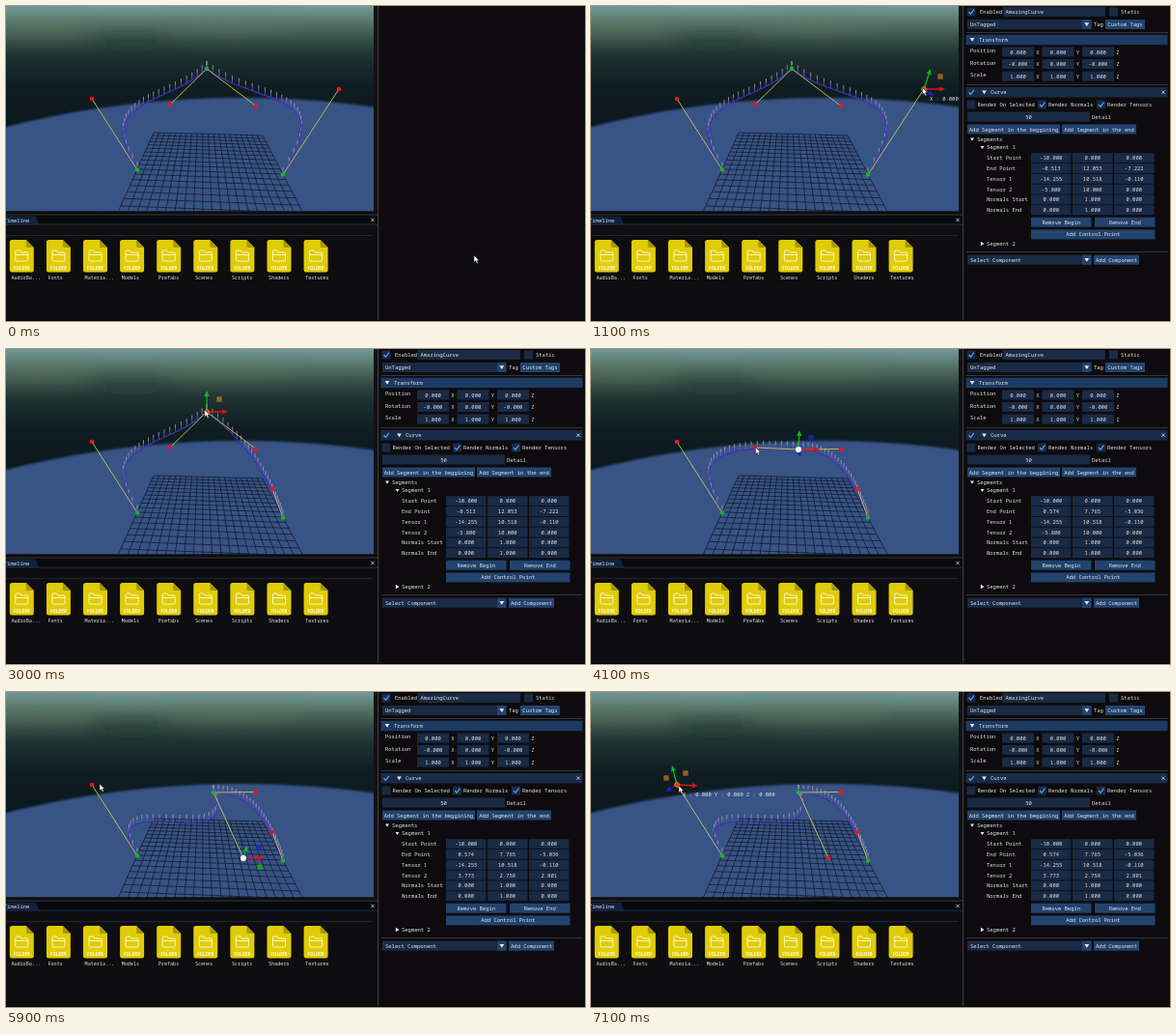
These frames come from a looping animation (600x326 px, 7.2 s). An HTML page:

```html
<!DOCTYPE html>
<html>
<head>
<meta charset="utf-8">
<style>
html, body { margin: 0; width: 100%; height: 100%; overflow: hidden; background: #0d0b0d; }
svg { display: block; width: 600px; height: 326px; }
text { font-family: "Noto Sans Mono", "DejaVu Sans Mono", monospace; font-size: 5.5px; fill: #e4e4e4; white-space: pre; }
</style>
</head>
<body>
<svg id="stage" viewBox="0 0 600 326">
  <defs>
    <linearGradient id="sky" x1="0" y1="0" x2="0" y2="130" gradientUnits="userSpaceOnUse">
      <stop offset="0" stop-color="#72999c"/>
      <stop offset=".07" stop-color="#64877f"/>
      <stop offset=".16" stop-color="#4f6c5e"/>
      <stop offset=".28" stop-color="#324a42"/>
      <stop offset=".4" stop-color="#1e3232"/>
      <stop offset=".62" stop-color="#0f1e23"/>
      <stop offset="1" stop-color="#0a161c"/>
    </linearGradient>
    <filter id="soft" x="-50%" y="-100%" width="200%" height="300%"><feGaussianBlur stdDeviation="9"/></filter>
    <filter id="edge" x="-5%" y="-5%" width="110%" height="110%"><feGaussianBlur stdDeviation=".8"/></filter>
    <clipPath id="view"><rect width="381" height="212.5"/></clipPath>
  </defs>
</svg>
<script>
const LOOP = 7200, STEP = 100;
const stage = document.getElementById("stage");

function add(parent, tag, attrs, str) {
  const n = document.createElementNS("http://www.w3.org/2000/svg", tag);
  for (const k in attrs) n.setAttribute(k, attrs[k]);
  if (str !== undefined) n.textContent = str;
  parent.appendChild(n);
  return n;
}
const set = (n, attrs) => { for (const k in attrs) n.setAttribute(k, attrs[k]); };
const rect = (p, x, y, width, height, fill) => add(p, "rect", { x, y, width, height, fill });
const label = (p, x, y, str, anchor = "start") =>
  add(p, "text", { x, y: y + 2, "text-anchor": anchor }, str);
const path = (p, d, stroke, width = 1, fill = "none") =>
  add(p, "path", { d, stroke, "stroke-width": width, fill });
const show = (n, on) => n.setAttribute("visibility", on ? "visible" : "hidden");
const mix = (a, b, k) => a.map((v, i) => v + (b[i] - v) * k);
const ease = k => k * k * (3 - 2 * k);
const span = (t, a, b) => ease(Math.min(1, Math.max(0, (t - a) / (b - a))));
const fix = v => v.toFixed(3);

// ---- Scene ----
const scene = add(stage, "g", { "clip-path": "url(#view)" });
rect(scene, 0, 0, 382, 213, "url(#sky)");
const clouds = add(scene, "g", { filter: "url(#soft)" });
[[35, 26, 55, 8, "#66806b"], [235, 22, 70, 7, "#5f7d6c"], [130, 42, 55, 7, "#20342f"]]
  .forEach(([cx, cy, rx, ry, fill]) => add(clouds, "ellipse", { cx, cy, rx, ry, fill, opacity: .4 }));
add(scene, "circle", { cx: 243, cy: 1095, r: 1000, fill: "#375385", filter: "url(#edge)" });

// Floor: 20 x 20 cells between two perspective edges
const FAR = 1.336, NEAR = .664;
const edgeAt = (a, b, k) => {
  const w = FAR * (1 - k), v = NEAR * k;
  return a.map((c, i) => (c * w + b[i] * v) / (w + v));
};
const farL = [153, 131], farR = [266, 134], nearL = [101.8, 245], nearR = [329, 254.4];
let floor = "";
for (let i = 0; i <= 20; i++) {
  const k = i / 20;
  floor += `M${mix(farL, farR, k)}L${mix(nearL, nearR, k)}`;
  floor += `M${edgeAt(farL, nearL, k)}L${edgeAt(farR, nearR, k)}`;
}
path(scene, floor, "#0b101c", .65);

const spikeTop = path(scene, "", "#b3a6c0", .75);
const spikeLow = path(scene, "", "#7257cf", .8);
const curve = path(scene, "", "#4130b4", 1.1);
const arms = path(scene, "", "#c9c94a", .9);
const dot = fill => add(scene, "circle", { r: 2.3, fill });
const ends = Array.from({ length: 3 }, () => dot("#17b51f"));
const tensors = Array.from({ length: 4 }, () => dot("#f5121a"));

// ---- Gizmo ----
const gizmo = add(scene, "g", {});
const axes = ["#2222c0", "#e01212", "#10b818"].map(c => ({
  line: path(gizmo, "", c, 1.3),
  head: path(gizmo, "", "none", 0, c)
}));
const planes = [0, 1].map(() => add(gizmo, "rect", { width: 5.4, height: 5.4, "fill-opacity": .75 }));
const hub = add(gizmo, "circle", {});
const readout = add(scene, "text", { fill: "#d8d8d8" });

// Each drag: selection time, drag span, travel, axis tips (blue, red, green) and plane handles
const drags = [
  { on: 900, from: 1100, to: 1800, a: [345, 86], b: [276, 145], move: [-5.214, -6.382, 1.947],
    tips: [[[10, 7], [22, 0], [7, -21]], [[8, -3], [22, 1], [3, -18]]],
    pads: [[17, -13, "#c07818"], [15, -10, "#2222c0"]] },
  { on: 2500, from: 3100, to: 3800, a: [208, 65], b: [215, 104], move: [1.087, -4.288, 2.186],
    tips: [[[0, 3], [22, 0], [0, -22]], [[2, 8], [22, 0], [1, -20]]],
    pads: [[13, -13, "#c07818"], [13, -12, "#2222c0"]] },
  { on: 4300, from: 4400, to: 5300, a: [170, 102], b: [246, 172], move: [9.573, -7.242, 2.801],
    tips: [[[-5, 5], [21, 0], [-2, -20]], [[4, -8], [21, 0], [4, -13]]],
    pads: [[-9, -9, "#c07818"], [16, -11, "#2222c0"], [17, 9, "#10b818"]] },
  { on: 6300, from: 7000, to: 7300, a: [89, 96], b: [89, 96], move: [0, 0, 0],
    tips: [[[-12, 7], [22, 1], [-5, -20]], [[-12, 7], [22, 1], [-5, -20]]],
    pads: [[-11, -7, "#c07818"], [9, -12, "#c07818"]] }
];

function arrow(axis, [cx, cy], [x, y]) {
  const len = Math.hypot(x, y) || 1, ux = x / len, uy = y / len;
  const head = Math.min(6, len * .6), bx = cx + x - ux * head, by = cy + y - uy * head;
  set(axis.line, { d: `M${cx} ${cy}L${bx} ${by}` });
  set(axis.head, { d: `M${cx + x} ${cy + y}L${bx - uy * 2.6} ${by + ux * 2.6}L${bx + uy * 2.6} ${by - ux * 2.6}Z` });
}

function drawGizmo(t, spots) {
  let i = drags.length - 1;
  while (i >= 0 && t < drags[i].on) i--;
  const g = drags[i], dragging = g && t >= g.from && t < g.to;
  gizmo.setAttribute("display", g ? "inline" : "none");
  show(readout, dragging);
  if (!g) return;
  const k = span(t, g.from, g.to), c = spots[i];
  axes.forEach((ax, j) => arrow(ax, c, mix(g.tips[0][j], g.tips[1][j], k)));
  const still = g.a[0] === g.b[0];
  const pads = still ? g.pads : k < .5 ? [g.pads[0]] : g.pads.slice(1);
  planes.forEach((p, j) => {
    show(p, j < pads.length);
    if (j < pads.length) set(p, { x: c[0] + pads[j][0] - 2.7, y: c[1] + pads[j][1] - 2.7, fill: pads[j][2] });
  });
  const moved = k > 0 && !still;
  set(hub, moved
    ? { cx: c[0], cy: c[1], r: 3, fill: "#fff", stroke: "none" }
    : { cx: c[0], cy: c[1], r: 2.3, fill: "#d82a14", stroke: "#ff8a1c", "stroke-width": 1 });
  if (dragging) {
    const [x, y, z] = g.move.map(v => fix(v * k));
    set(readout, { x: c[0] + 6, y: c[1] + 12 });
    readout.textContent = `X : ${x} Y : ${y} Z : ${z}`;
  }
}

function drawCurve([right, tip, inner, left]) {
  const start = [136, 169.5], stop = [287, 174.5], mid = [259, 103.5];
  const segs = [[start, left, inner, tip], [tip, mid, right, stop]];
  let line = "", low = "", top = "";
  for (const [a, b, c, d] of segs) {
    line += `M${a}C${b} ${c} ${d}`;
    for (let i = 0; i <= 25; i++) {
      const k = i / 25, m = 1 - k;
      const [x, y] = [0, 1].map(j =>
        m * m * m * a[j] + 3 * m * m * k * b[j] + 3 * m * k * k * c[j] + k * k * k * d[j]);
      low += `M${x} ${y}v-4`;
      top += `M${x} ${y - 4}v-4`;
    }
  }
  set(curve, { d: line });
  set(spikeLow, { d: low });
  set(spikeTop, { d: top });
  set(arms, { d: `M${start}L${left}M${inner}L${tip}L${mid}M${right}L${stop}` });
  [start, tip, stop].forEach(([cx, cy], i) => set(ends[i], { cx, cy }));
  [left, inner, mid, right].forEach(([cx, cy], i) => set(tensors[i], { cx, cy }));
}

// ---- Lower panel ----
rect(stage, 381, 0, 5, 326, "#121113");
rect(stage, 0, 212.5, 386, 113.5, "#0e0d0f");
rect(stage, 0, 215.5, 385, 1, "#34353b");
rect(stage, 0, 217, 385, 9, "#08090c");
path(stage, "M0 217.5H31L34 226H0Z", "none", 0, "#10223c");
rect(stage, 0, 225.6, 385, .9, "#1f3453");
rect(stage, 0, 237, 380, .8, "#232a38");
label(stage, -2, 221.6, "Timeline");
path(stage, "M378.3 219.8l3.4 3.4m0-3.4l-3.4 3.4", "#e4e4e4", .8);
rect(stage, 385, 0, 1.2, 326, "#3b3a40");
rect(stage, 0, 325, 600, 1, "#050506");

["AudioBa...", "Fonts", "Materia...", "Models", "Prefabs", "Scenes", "Scripts", "Shaders", "Textures"]
  .forEach((name, i) => {
    const x = 3.8 + i * 38.1;
    const g = add(stage, "g", { transform: `translate(${x} 242)` });
    path(g, "M2.5 0H17L25 8V31Q25 33.5 22.5 33.5H2.5Q0 33.5 0 31V2.5Q0 0 2.5 0Z", "none", 0, "#e0cc08");
    path(g, "M17 0L25 8H18.5Q17 8 17 6.5Z", "none", 0, "#a89a08");
    path(g, "M6 21V12Q6 11 7 11H10.5L12 13H18Q19 13 19 14V21Q19 22 18 22H7Q6 22 6 21ZM6 15.5H19", "#fffbd6", .9);
    add(g, "text", { x: 12.5, y: 30.7, "text-anchor": "middle",
      style: "font: bold 4.4px 'Open Sans', sans-serif; fill: #fffbe0" }, "FOLDER");
    add(stage, "text", { x: x + 1.6, y: 282.8, style: "font-size: 5.1px" }, name);
  });

// ---- Inspector ----
const panel = add(stage, "g", {});
const FIELD = "#192a45", BUTTON = "#22436e";
const field = (x, y, w, str) => {
  rect(panel, x, y - 5, w, 10, FIELD);
  return label(panel, x + w / 2, y, str, "middle");
};
const button = (x, y, w, str) => {
  rect(panel, x, y - 5, w, 10, BUTTON);
  label(panel, x + w / 2, y, str, "middle");
};
const check = (x, y, on, str, gap = 11) => {
  rect(panel, x, y - 4.5, 9, 9, FIELD);
  if (on) path(panel, `M${x + 2} ${y}l2 2.3l3.4-4.6`, "#4c9cf5", 1.3);
  label(panel, x + gap, y, str);
};
const down = (x, y, s = 2.4) =>
  path(panel, `M${x - s} ${y - s * .75}h${2 * s}l${-s} ${s * 1.6}Z`, "none", 0, "#e8e8e8");
const side = (x, y) => path(panel, `M${x - 1.6} ${y - 2.3}v4.6l3.6-2.3Z`, "none", 0, "#e8e8e8");
const combo = (y, str) => {
  rect(panel, 390, y - 5, 128.5, 10, FIELD);
  rect(panel, 509, y - 5, 9.5, 10, BUTTON);
  down(513.8, y);
  label(panel, 393, y, str);
};
const rule = y => rect(panel, 389, y, 209, .9, "#3a3a43");

check(389.5, 6, true, "Enabled", 13.5);
rect(panel, 426.5, 1, 106.5, 10, FIELD);
label(panel, 429.5, 6, "AmazingCurve");
check(537, 6, false, "Static", 12);
combo(19, "UnTagged");
label(panel, 521, 19, "Tag");
button(533, 19, 41, "Custom Tags");
rule(27);

rect(panel, 388.5, 29.7, 209, 10.5, "#1d3a62");
down(395, 34.7);
label(panel, 402, 34.7, "Transform");
[["Position", 47.5, "0.000", "0.000", "0.000"],
 ["Rotation", 60, "-0.000", "0.000", "-0.000"],
 ["Scale", 72.6, "1.000", "1.000", "1.000"]].forEach(([name, y, ...vals]) => {
  label(panel, 393, y - 1.2, name);
  vals.forEach((v, i) => {
    field(426 + i * 41.5, y, 33, v);
    label(panel, 463 + i * 41.5, y, "XYZ"[i], "middle");
  });
});
rule(81);

rect(panel, 388.5, 84, 209, 10.5, "#172c49");
check(389.5, 89.2, true, "");
down(407.5, 89.2);
label(panel, 414, 89.2, "Curve");
path(panel, "M591.3 87.5l3.4 3.4m0-3.4l-3.4 3.4", "#e4e4e4", .8);
check(389.5, 102, false, "Render On Selected");
check(463, 102, true, "Render Normals");
check(524, 102, true, "Render Tensors");
field(390, 114.5, 127, "50");
label(panel, 519, 114.5, "Detail");
button(390, 127.5, 96, "Add Segment in the beggining");
button(488, 127.5, 77, "Add Segment in the end");
down(395, 138, 2);
label(panel, 400, 138, "Segments");
down(405.5, 146.4, 2);
label(panel, 410, 146.4, "Segment 1");

const rows = [
  ["Start Point", -10, 0, 0], ["End Point", -.513, 12.053, -7.222],
  ["Tensor 1", -14.255, 10.518, -.11], ["Tensor 2", -5.8, 10, 0],
  ["Normals Start", 0, 1, 0], ["Normals End", 0, 1, 0]
].map(([name, ...vals], i) => {
  const y = 157.2 + i * 10.8;
  label(panel, 410, y, name);
  return { vals, cells: vals.map((v, j) => field(456 + j * 43, y, 41.5, fix(v))) };
});
button(456, 223.7, 62.5, "Remove Begin");
button(522, 223.7, 62.5, "Remove End");
button(456, 236.4, 128.5, "Add Control Point");
side(405.5, 246);
label(panel, 410, 246, "Segment 2");
rule(254);
combo(262.7, "Select Component");
button(521, 262.7, 47, "Add Component");

// ---- Pointer ----
const pointer = path(stage, "M0 0V7.2L1.7 5.7L2.9 8.4L4.2 7.8L3 5.2H5.2Z", "#15151a", .5, "#fff");
const route = [
  [0, 485, 258], [100, 485, 258], [800, 343.5, 84.5], [1100, 343.5, 84.5], [1800, 276, 145], [1850, 276, 145],
  [2100, 215.5, 79], [2300, 206, 63], [3100, 206, 63], [3800, 215, 104], [3850, 215, 104],
  [4100, 170.5, 101.5], [4400, 170.5, 101.5], [5300, 246, 172], [5450, 246, 172],
  [5900, 97, 95], [6100, 91, 97], [LOOP, 91, 97]
];
function movePointer(t) {
  const i = route.findIndex(p => p[0] > t);
  const [t0, ...a] = route[i - 1], [t1, ...b] = route[i];
  set(pointer, { transform: `translate(${mix(a, b, span(t, t0, t1))})` });
}

function update(t) {
  const spots = drags.map(g => mix(g.a, g.b, span(t, g.from, g.to)));
  drawCurve(spots);
  drawGizmo(t, spots);
  [[1, 1], [3, 2]].forEach(([row, n]) => {
    const g = drags[n], k = span(t, g.from, g.to);
    rows[row].cells.forEach((c, j) => { c.textContent = fix(rows[row].vals[j] + g.move[j] * k); });
  });
  show(panel, t >= 900);
  movePointer(t);
}

const begin = performance.now();
function tick() {
  const t = Math.max(0, performance.now() - begin) % LOOP;
  update(Math.floor(t / STEP) * STEP);
  requestAnimationFrame(tick);
}
tick();
</script>
</body>
</html>
```
